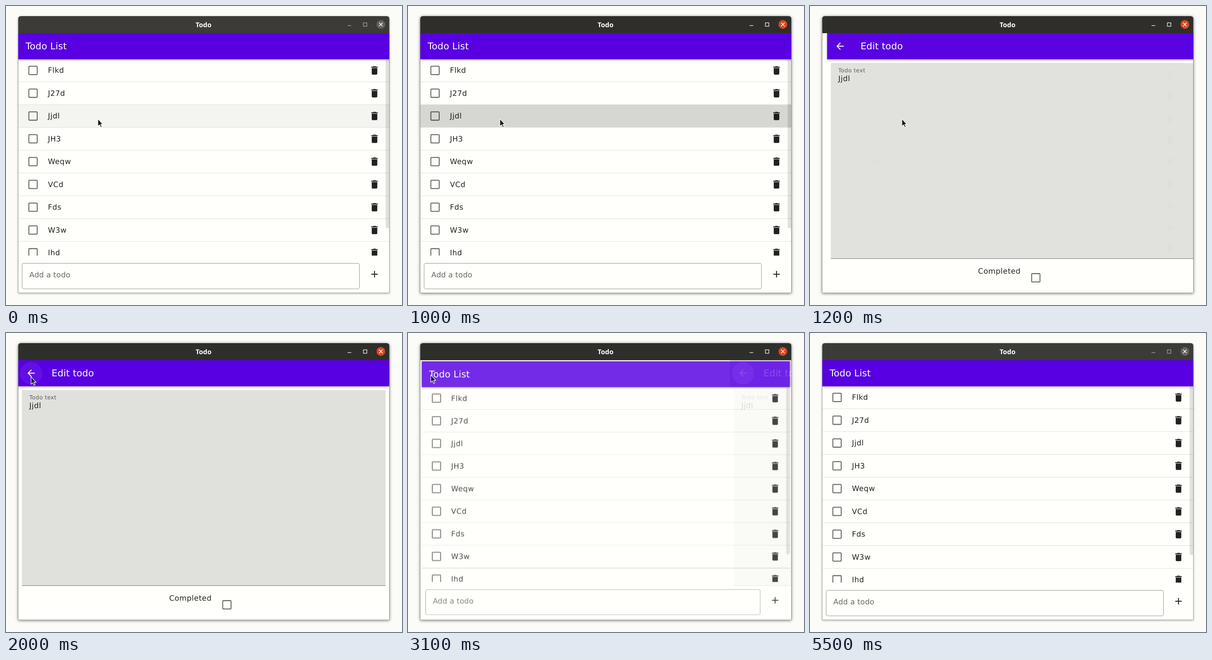
Animation, 862 px wide and 649 px high, one loop 5.7 s. Source, as an HTML page:

```html
<!DOCTYPE html>
<html lang="en">
<head>
<meta charset="utf-8">
<title>Todo</title>
<style>
  html, body { margin: 0; height: 100%; overflow: hidden; background: #fbfcf7; }
  svg { display: block; font: 16px "DejaVu Sans", sans-serif; letter-spacing: .5px; text-rendering: geometricPrecision; }
  text { white-space: pre; }
  .ink { fill: #000; fill-opacity: .87; }
  .dim { fill: #000; fill-opacity: .6; }
  .white { fill: #fff; }
  .box { fill: none; stroke: #000; stroke-opacity: .6; stroke-width: 2; }
  .bar { fill: #5800e2; filter: drop-shadow(0 2px 2px rgba(0, 0, 0, .3)); }
  .head { font-size: 20px; letter-spacing: .15px; fill: #fff; }
  .caption { font: bold 14.5px "Noto Sans", sans-serif; letter-spacing: 0; text-anchor: middle; fill: #fff; }
  #frame { filter: drop-shadow(0 1px 3px rgba(0, 0, 0, .55)); }
  #title { fill: #2f2e2b; }
  #buttons { fill: none; stroke: #fff; stroke-width: 1.2; }
  #close { fill: #d9481f; }
  .idle #frame { filter: drop-shadow(0 1px 2px rgba(0, 0, 0, .35)); }
  .idle #title { fill: #3c3b38; }
  .idle #buttons { stroke: #a9a9a6; }
  .idle #close { fill: #62615f; }
</style>
</head>
<body>
<svg id="stage" width="862" height="649" viewBox="0 0 862 649">
  <defs>
    <clipPath id="content"><rect width="800" height="558"/></clipPath>
    <clipPath id="rows"><rect y="56" width="800" height="422"/></clipPath>
    <clipPath id="pressedRow"><rect y="154" width="800" height="48"/></clipPath>
  </defs>

  <g id="frame">
    <path d="M26.5 623V28q0-6 6-6H828.500q6 0 6 6V623z" fill="#fffffb"/>
  </g>
  <path id="title" d="M26.500 59V28q0-6 6-6H828.500q6 0 6 6V59z"/>
  <text class="caption" x="430" y="46">Todo</text>
  <g id="buttons"><path d="M743.500 42.500h8"/><rect x="778" y="36.500" width="7.500" height="7.500"/></g>
  <circle id="close" cx="816" cy="40" r="9.500"/>
  <path d="M812.300 36.300l7.400 7.400m0-7.400l-7.400 7.400" stroke="#fff" stroke-width="1.500"/>

  <g transform="translate(26.5 59) scale(1.01)" clip-path="url(#content)">
    <g id="list">
      <rect class="bar" width="800" height="56"/>
      <text class="head" x="16" y="35">Todo List</text>
      <g clip-path="url(#rows)">
        <rect id="rowHover" y="154" width="800" height="48" fill-opacity=".045"/>
        <g clip-path="url(#pressedRow)"><circle id="rowRipple"/></g>
        <g id="items"></g>
        <rect x="792" y="56" width="8" height="363" rx="4" fill-opacity=".12"/>
      </g>
      <rect x="8.500" y="494.500" width="727" height="55" rx="4" fill="none" stroke="#000" stroke-opacity=".42"/>
      <text class="dim" x="24" y="524.700" letter-spacing=".15" style="letter-spacing:.15px">Add a todo</text>
      <path class="ink" transform="translate(756 506)" d="M19 13h-6v6h-2v-6H5v-2h6V5h2v6h6z"/>
    </g>
    <g id="edit">
      <rect class="bar" width="800" height="56"/>
      <circle id="backHover" class="white" cx="28" cy="28" r="24" fill-opacity=".06"/>
      <circle id="backRipple" class="white"/>
      <path class="white" transform="translate(16 16)" d="M20 11H7.830l5.590-5.590L12 4l-8 8 8 8 1.410-1.410L7.830 13H20z"/>
      <text class="head" x="72" y="35">Edit todo</text>
      <path d="M8 485V68q0-4 4-4H788q4 0 4 4V485z" fill-opacity=".12"/>
      <rect x="8" y="484" width="784" height="1" fill-opacity=".48"/>
      <text class="dim" x="24" y="84.200" style="font-size:12px;letter-spacing:.4px">Todo text</text>
      <text class="ink" x="24" y="103.200">Jjdl</text>
      <text class="ink" x="325.400" y="517">Completed</text>
      <rect class="box" x="440.800" y="516.700" width="18" height="18" rx="1.500"/>
    </g>
  </g>
  <path d="M26.500 59V622.500H834.500V59" fill="none" stroke="#000" stroke-opacity=".3"/>
  <path id="cursor" d="M0 0V16.200L3.700 12.900L6.300 18.600L8.800 17.500L6.300 11.900H11z" fill="#1c1c1c" stroke="#fff" stroke-width="1.100" stroke-linejoin="round"/>
</svg>
<script>
const $ = id => document.getElementById(id);
const LOOP = 5700, STEP = 100, WIDTH = 800;
const names = ['Flkd', 'J27d', 'Jjdl', 'JH3', 'Weqw', 'VCd', 'Fds', 'W3w', 'Ihd'];
const trash = 'M6 19c0 1.1.9 2 2 2h8c1.1 0 2-.9 2-2V7H6zM19 4h-3.5l-1-1h-5l-1 1H5v2h14z';

$('items').innerHTML = names.map((name, i) => `
  <g transform="translate(0 ${56 + 49 * i})">
    <rect class="box" x="23" y="15" width="18" height="18" rx="1.5"/>
    <text class="ink" x="64" y="29.5">${name}</text>
    <path class="ink" transform="translate(756 12)" d="${trash}"/>
    <rect y="48" width="800" height="1" fill-opacity=".13"/>
  </g>`).join('');

// Pointer stops: time, x, y
const stops = [
  [0, 200, 245], [1300, 194, 237], [1600, 124, 128], [1800, 102, 118],
  [1900, 72, 103], [2000, 54.5, 95], [2300, 49.5, 91], [3700, 41, 52], [3900, 40, 3],
];

const clamp = x => Math.min(1, Math.max(0, x));
const mix = (a, b, k) => a + (b - a) * k;
const show = (id, on) => $(id).setAttribute('visibility', on ? 'inherit' : 'hidden');

// cubic-bezier(.4, 0, .2, 1)
function ease(x) {
  x = clamp(x);
  let lo = 0, hi = 1;
  for (let i = 0; i < 24; i++) {
    const s = (lo + hi) / 2;
    if (1.2 * s * (1 - s) ** 2 + .6 * s * s * (1 - s) + s ** 3 < x) lo = s; else hi = s;
  }
  return lo * lo * (3 - 2 * lo);
}

function ripple(id, elapsed, from, to, radii, alpha) {
  const k = clamp(elapsed / 225), el = $(id);
  el.setAttribute('cx', mix(from[0], to[0], k));
  el.setAttribute('cy', mix(from[1], to[1], k));
  el.setAttribute('r', mix(...radii, ease(k)));
  el.setAttribute('fill-opacity', alpha * clamp(elapsed / 75));
}

function editProgress(t) {
  if (t < 1100) return 0;
  if (t < 3000) return ease((t - 945) / 300);
  return 1 - ease((26 + (t - 3000) * 1.4) / 300);
}

function draw(t) {
  $('stage').classList.toggle('idle', t < 700 || t >= 5500);

  const p = editProgress(t);
  $('list').setAttribute('opacity', 1 - p);
  $('list').setAttribute('transform', `translate(400 279) scale(${1 - .05 * p}) translate(-400 -279)`);
  $('edit').setAttribute('opacity', p);
  $('edit').setAttribute('transform', `translate(${WIDTH * (1 - p)} 0)`);

  show('rowHover', t < 3000);
  show('rowRipple', t < 1100);
  ripple('rowRipple', t - 770, [172, 184], [400, 178], [240, 411], .12);
  show('backHover', t >= 2000);
  ripple('backRipple', t - 2670, [23, 31], [28, 28], [14.4, 24], .22);

  const [, x, y] = stops.findLast(stop => stop[0] <= t);
  $('cursor').setAttribute('transform', `translate(${x} ${y})`);
  show('cursor', t < 4100);
}

function tick() {
  draw(Math.floor(performance.now() % LOOP / STEP) * STEP);
  requestAnimationFrame(tick);
}
tick();
</script>
</body>
</html>
```
